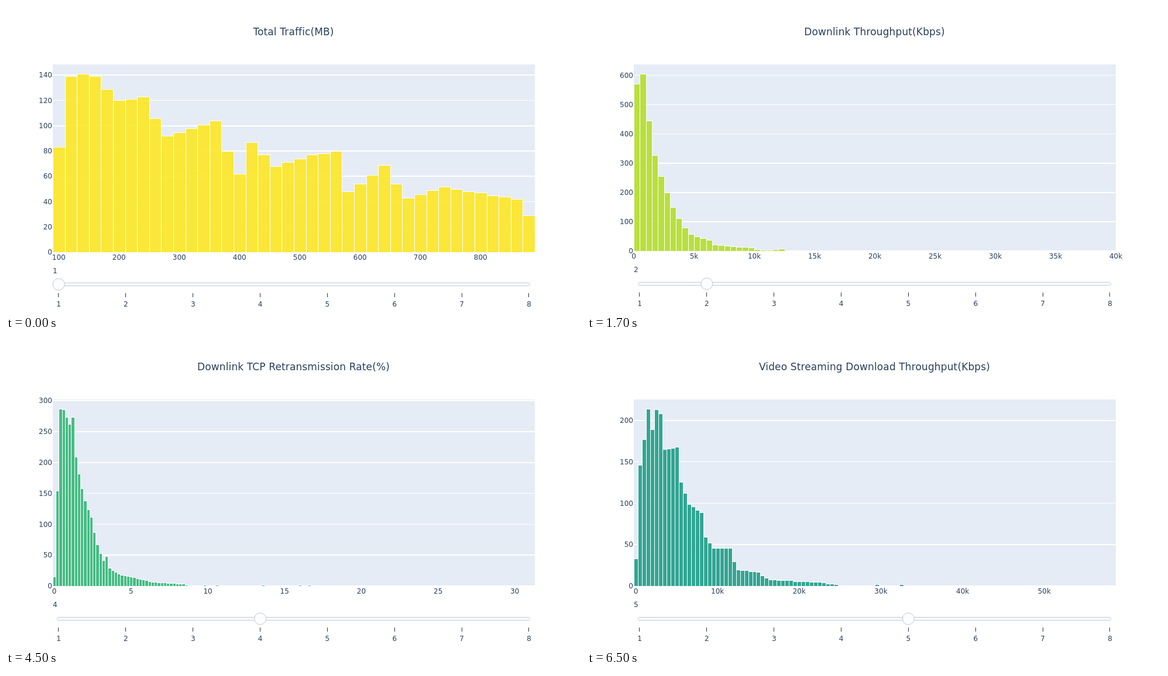
Recreate the animation shown at these times as an HTML page. Size 983 by 525 pixels, loop 8 s.

```html
<!DOCTYPE html>
<html lang="en">
<head>
<meta charset="utf-8">
<title>Histograms</title>
<style>
  html, body { margin: 0; width: 100%; height: 100%; overflow: hidden; background: #fff; }
  svg { display: block; width: 983px; height: 525px; }
  text { font: 12px "DejaVu Sans", Verdana, sans-serif; fill: #2a3f5f; white-space: pre; }
  .title { font-size: 17px; letter-spacing: .13px; }
</style>
</head>
<body>
<svg id="stage" viewBox="0 0 983 525"></svg>
<script>
const LEFT = 80, WIDTH = 824, TOP = 100, LOOP = 8000;

// keys: [bin, count] points of the outline; bins past the last key are sparse outliers
const charts = [
  {
    title: "Total Traffic(MB)", color: "#fde725", until: 500, base: 421,
    start: 90, bins: 40, bin: 20, tickX: 100, tickY: 20,
    keys: [[0, 83], [1, 139], [2, 141], [3, 139], [5, 120], [7, 123], [9, 92], [13, 104], [15, 62],
      [16, 87], [18, 68], [21, 77], [23, 80], [24, 48], [27, 69], [29, 43], [32, 52], [38, 42], [39, 29]]
  },
  {
    title: "Downlink Throughput(Kbps)", color: "#b5de2b", until: 2500, base: 419,
    start: 0, bins: 80, bin: 500, tickX: 5000, tickY: 100,
    keys: [[0, 570], [1, 605], [3, 327], [5, 200], [7, 111], [9, 57], [12, 37], [13, 21], [19, 12],
      [21, 3], [24, 7], [25, 2], [34, 2]]
  },
  {
    title: "Uplink Throughput(Kbps)", color: "#6ece58", until: 4500, base: 419,
    start: 0, bins: 208, bin: 20, tickX: 500, tickY: 50,
    keys: [[0, 42], [1, 235], [2, 333], [4, 344], [5, 288], [7, 212], [8, 127], [10, 113], [12, 91],
      [14, 56], [17, 44], [19, 19], [24, 14], [29, 9], [31, 3], [48, 2]]
  },
  {
    title: "Downlink TCP Retransmission Rate(%)", color: "#35b779", until: 6500, base: 419,
    start: -.1, bins: 157, bin: .2, tickX: 5, tickY: 50,
    keys: [[0, 15], [1, 154], [2, 287], [3, 286], [5, 262], [6, 274], [7, 209], [10, 138], [12, 112],
      [14, 67], [16, 42], [17, 48], [18, 29], [22, 18], [26, 14], [32, 7], [42, 4]]
  },
  {
    title: "Video Streaming Download Throughput(Kbps)", color: "#1f9e89", until: LOOP, base: 419,
    start: -250, bins: 118, bin: 500, tickX: 10000, tickY: 50,
    keys: [[0, 33], [1, 146], [3, 214], [4, 189], [5, 213], [6, 208], [7, 165], [10, 168], [11, 126],
      [13, 99], [16, 89], [17, 59], [19, 46], [23, 46], [25, 20], [30, 17], [33, 8], [45, 5], [49, 2]]
  }
];

const stage = document.getElementById("stage");

const rect = (x, y, w, h, attrs) =>
  `<rect x="${x}" y="${y}" width="${w}" height="${h}" ${attrs}/>`;

const label = (x, y, s, anchor = "middle", cls = "") =>
  `<text x="${x}" y="${y}" text-anchor="${anchor}" class="${cls}">${s}</text>`;

const short = v => v >= 5000 ? v / 1000 + "k" : v;

function randomFrom(seed) {
  return () => (seed = seed * 16807 % 2147483647) / 2147483647;
}

// Geometric interpolation between keys, then ever rarer counts of 1 or 2
function histogram({ keys, bins }) {
  const random = randomFrom(bins * 977);
  const end = keys[keys.length - 1][0];
  return Array.from({ length: bins }, (_, i) => {
    if (i <= end) {
      const k = Math.max(1, keys.findIndex(([b]) => b >= i));
      const [b0, n0] = keys[k - 1], [b1, n1] = keys[k];
      return Math.round(n0 * (n1 / n0) ** ((i - b0) / (b1 - b0)));
    }
    const chance = .8 * Math.exp(-4 * (i - end) / (bins - end));
    const r = random();
    return i === bins - 1 ? 1 : r < chance * .3 ? 2 : r < chance ? 1 : 0;
  });
}

function plot(c) {
  const height = c.base - TOP, span = c.bins * c.bin;
  const counts = histogram(c);
  const max = Math.max(...counts) / .95;
  const px = v => LEFT + (v - c.start) / span * WIDTH;
  const py = v => c.base - v / max * height;
  const edge = v => Math.round(v) + .5;
  let out = rect(LEFT, TOP, WIDTH, height, 'fill="#e5ecf6"');

  for (let v = 0; v <= max; v += c.tickY) {
    const y = py(v), top = Math.round(y - .8);
    out += rect(LEFT, top, WIDTH, Math.round(y + .8) - top, 'fill="#fff"');
    out += label(79, y + 4.2, v, "end");
  }

  const style = `fill="${c.color}" stroke="#fff" opacity=".9"`;
  const bars = counts.map((n, i) => {
    if (!n) return "";
    const x = edge(px(c.start + i * c.bin)), y = edge(py(n));
    const w = edge(px(c.start + (i + 1) * c.bin)) - x;
    return rect(x, y, w, edge(c.base) - y, style);
  });
  out += `<clipPath id="area">${rect(LEFT, TOP, WIDTH, height, "")}</clipPath>`;
  out += `<g clip-path="url(#area)">${bars.join("")}</g>`;

  const first = Math.ceil(c.start / c.tickX) * c.tickX;
  for (let v = first; v <= c.start + span; v += c.tickX) {
    out += label(px(v), c.base + 13, short(v || 0));
  }
  return out;
}

function slider(c, active) {
  const dy = c.base > 419 ? 1 : 0;
  const at = i => 89.9 + i * 114.86;
  let out = label(LEFT, c.base + 36, active + 1, "start");
  out += rect(87.5, 472.5 + dy, 808, 5, 'rx="2" fill="#fff" stroke="#bec8d9"');
  for (let i = 0; i < 8; i++) {
    out += rect(Math.floor(at(i)), 490 + dy, 1, 7, 'fill="#333"');
    out += label(at(i) + .1, 513 + dy, i + 1);
  }
  return out + `<circle cx="${at(active) + .1}" cy="${475 + dy}" r="10" fill="#fcfdfe" stroke="#bec8d9"/>`;
}

const views = charts.map((c, i) =>
  label(491.5, 50, c.title, "middle", "title") + plot(c) + slider(c, i));

let shown = -1;
function draw(now) {
  const t = now % LOOP;
  const i = charts.findIndex(c => t < c.until);
  if (i !== shown) stage.innerHTML = views[shown = i];
}

function loop(now) {
  draw(now);
  requestAnimationFrame(loop);
}
draw(0);
requestAnimationFrame(loop);
</script>
</body>
</html>
```
